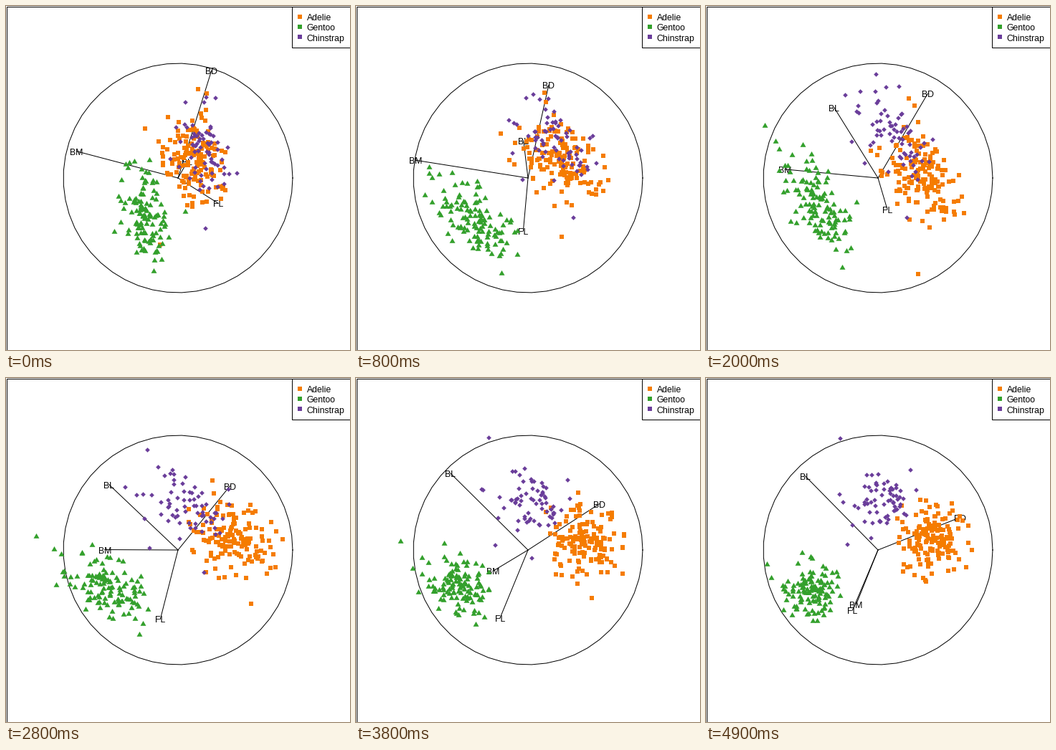
A matplotlib script that plays this animation: 480x480 px, repeating every 5 s.

```python
import numpy as np
import matplotlib.pyplot as plt
from matplotlib.animation import FuncAnimation

SIZE, DPI, FRAMES, INTERVAL = 480, 100, 50, 100
CENTER = 240 + 240j
RADIUS, DATA_SCALE, SPREAD = 160, 56, 0.54
PT = 72 / DPI  # points per pixel
plt.rcParams["font.family"] = "Liberation Sans"

AXIS_NAMES = ["BL", "BD", "FL", "BM"]
TRIANGLE = [(-0.866, -0.5), (0.866, -0.5), (0, 1), (-0.866, -0.5)]

# name, colour, marker, marker size, count, correlation between variables,
# mean and most unusual individual in standard units
SPECIES = [
    ("Adelie", "#f57c00", "s", 6.4, 146, 0.45,
     (-0.95, 0.61, -0.78, -0.63), (0.37, 2.2, -0.5, 0)),
    ("Gentoo", "#33a02c", TRIANGLE, 9.2, 119, 0.68,
     (0.65, -1.1, 1.16, 1.08), (2.85, -0.08, 2.07, 2.29)),
    ("Chinstrap", "#6a3d9a", "D", 4.7, 68, 0.57,
     (0.88, 0.64, -0.37, -0.59), (2.56, 0.33, -1.42, -0.63)),
]

# Evenly spaced stops of the tour: where BL, BD and FL point (x + iy)
STOPS = np.array([
    (0.08 + 0.14j, 0.29 + 0.93j, 0.35 - 0.22j),
    (-0.08 + 0.37j, 0.18 + 0.78j, -0.09 - 0.48j),
    (-0.38 + 0.61j, 0.43 + 0.73j, 0.08 - 0.27j),
    (-0.63 + 0.56j, 0.46 + 0.51j, -0.20 - 0.65j),
    (-0.66 + 0.67j, 0.64 + 0.37j, -0.24 - 0.56j),
    (-0.63 + 0.64j, 0.71 + 0.28j, -0.22 - 0.52j),
])
SLOPES = np.gradient(STOPS, axis=0)
SLOPES[-1] = 0  # the tour settles at its end


def axes_at(frame):
    """Directions of all four axes; squares summing to zero keep them orthogonal."""
    i, t = divmod(frame * (len(STOPS) - 1) / FRAMES, 1)
    i = int(i)
    ease = t * t * (3 - 2 * t)
    first = (STOPS[i] + ease * (STOPS[i + 1] - STOPS[i])
             + t * (1 - t) ** 2 * SLOPES[i] - t * t * (1 - t) * SLOPES[i + 1])
    axes = np.append(first, -np.sqrt(-np.sum(first ** 2)))
    return axes * np.sqrt(2 / np.sum(np.abs(axes) ** 2))


def make_cloud(rng, count, corr, mean, unusual):
    """Normal cloud whose variables share one common factor."""
    shared = rng.normal(size=(count - 1, 1))
    own = rng.normal(size=(count - 1, 4))
    z = np.sqrt(corr) * shared + np.sqrt(1 - corr) * own
    z = SPREAD * (z - z.mean(axis=0)) / z.std(axis=0)
    return np.vstack([mean + z, unusual])


def to_stage(z, scale):
    z = CENTER + scale * np.conj(z)
    return z.real, z.imag


fig = plt.figure(figsize=(SIZE / DPI, SIZE / DPI), dpi=DPI, facecolor="white")
ax = fig.add_axes([0, 0, 1, 1])
ax.set(xlim=(0, SIZE), ylim=(SIZE, 0))
ax.axis("off")

line_style = dict(color="black", lw=PT)
text_style = dict(fontsize=12.3 * PT, color="black")


def box(x0, y0, x1, y1, z):
    ax.fill([x0, x1, x1, x0], [y0, y0, y1, y1], fc="white", ec="black",
            lw=PT, zorder=z)


box(0.5, 0.5, 479.5, 479.5, 0)
circle = np.exp(1j * np.linspace(0, 2 * np.pi, 50))
ax.plot(*to_stage(circle, RADIUS), zorder=1, **line_style)

spokes = [ax.plot([], [], zorder=2, **line_style)[0] for _ in AXIS_NAMES]
labels = [ax.text(0, 0, name, ha="center", va="center", zorder=3, **text_style)
          for name in AXIS_NAMES]

rng = np.random.default_rng(7)
clouds = []
box(398.5, 0.5, 479.5, 57.5, 8)
for row, (name, color, marker, size, *shape) in enumerate(SPECIES):
    style = dict(ls="", mfc=color, mew=0, antialiased=False)
    dots, = ax.plot([], [], marker=marker, ms=size * PT, zorder=4 + row, **style)
    clouds.append((dots, make_cloud(rng, *shape)))
    y = 14.5 + 14.3 * row
    ax.plot(409.5, y, marker="s", ms=5.5 * PT, zorder=9, **style)
    ax.text(419.5, y + 5.7, name, va="baseline", zorder=9, **text_style)


def update(frame):
    axes = axes_at(frame)
    for x, y, spoke, label in zip(*to_stage(axes, RADIUS), spokes, labels):
        spoke.set_data([CENTER.real, x], [CENTER.imag, y])
        label.set_position((x, y + 2))
    for dots, data in clouds:
        dots.set_data(*to_stage(data @ axes, DATA_SCALE))
    return [*spokes, *labels, *(dots for dots, _ in clouds)]


anim = FuncAnimation(fig, update, frames=FRAMES, interval=INTERVAL,
                     repeat=True, repeat_delay=0)
plt.show()
```
